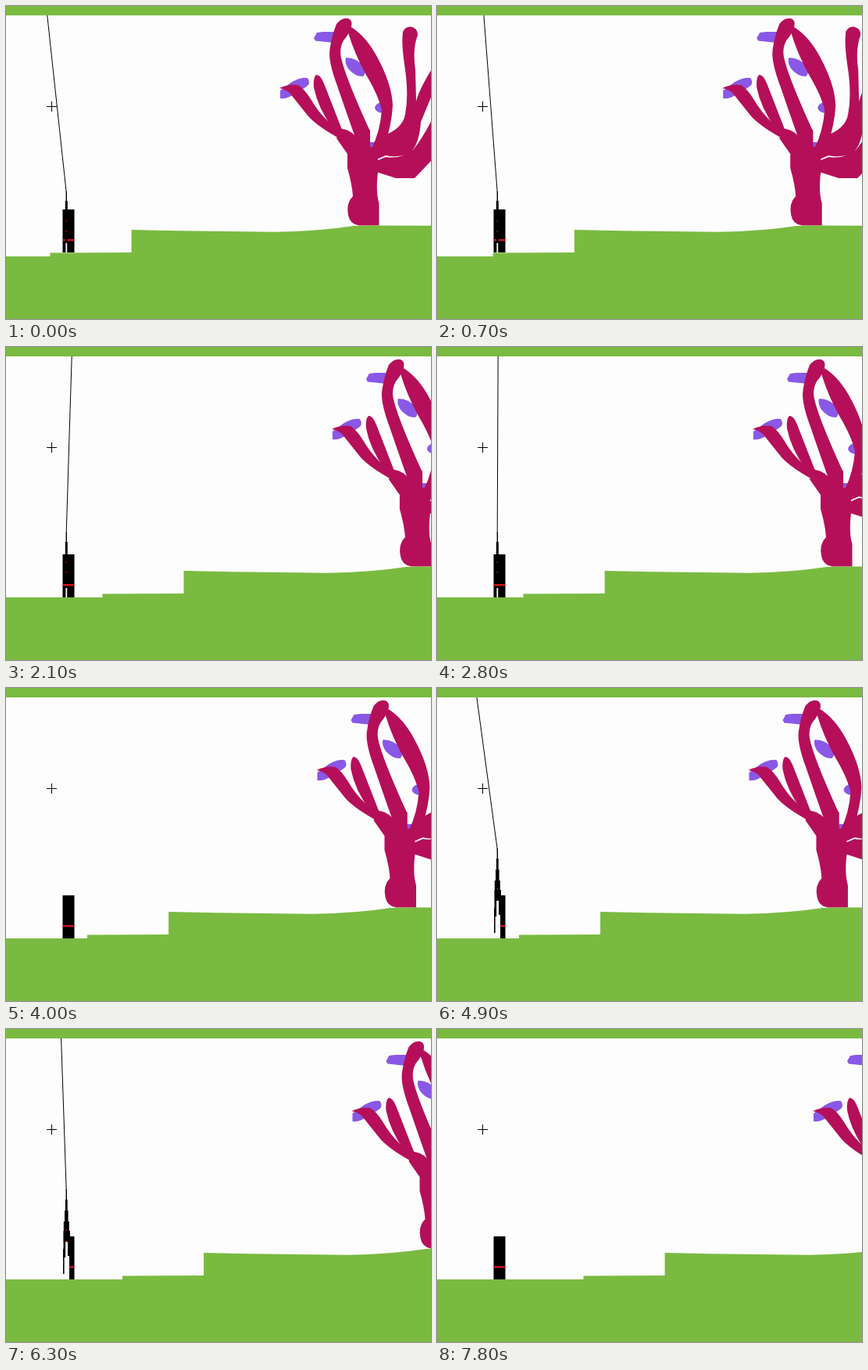
These frames come from a looping animation (544x400 px, 8 s). An HTML page with a canvas:

```html
<!DOCTYPE html>
<html lang="en">
<head>
<meta charset="utf-8">
<title>Rope swing</title>
<style>
  html, body { margin: 0; width: 100%; height: 100%; overflow: hidden; background: #fdfdfd; }
  canvas { display: block; }
</style>
</head>
<body>
<canvas id="stage" width="544" height="400"></canvas>
<script>
const ctx = document.getElementById('stage').getContext('2d');
const LOOP = 8000, STEP = 100;
const GREEN = '#7aba40', SKY = '#fdfdfd', BARK = '#b50f59', PETAL = '#8a58e6', RED = '#d8141c';

// Scroll keys: time in ms, offset in px, speed in px per step
const scrollKeys = [
  [0, 0, 0], [900, 26, 6.2], [1300, 58.5, 6.5], [1700, 71, 0], [2800, 54, -1.1], [4000, 47.5, 0],
  [4700, 47.5, 0], [5500, 62, 3.5], [6300, 92.5, 3.7], [7800, 131, 1.2]
];

const ground = new Path2D(`M-200 320H56.500V315.500L160.600 315V286L220 287.300L345 288.700
  Q400 288 445 281L470 280.500L700 281V400H-200Z`);

const petals = new Path2D(`
  M394 41L398 34L406 33H425V47.500L396 44.500Z
  M435 66Q450 66 460 79Q461 86 457 90Q446 90 438 80Q433 72 435 66Z
  M351 108L366 97Q377 91 386 92Q390 98 386 102L377 108L363 116Q357 119 351 118Z
  M483 122Q473 124 472 130Q473 136 483 137Z
  M463 174H473V183H463Z`);

const tree = [
  // trunk
  'M423 169L428 157Q438 157 446 165L466 158V180L476 179V212Q473 238 477.500 252V280.500H452Q440 279 438 267Q435 252 444 243Q443 228 437 207V189Z',
  // loop, left and right limbs
  'M446 165Q436 137 424 102Q412 70 414.500 55Q417 38 423 23Q430 14 438 16Q444 18 442 27Q439 36 432 44Q427 53 428.500 64Q433 88 466 160V185Z',
  'M438 34L442 27Q461 39 475 65Q494 100 495 127Q494 150 484 182L478 195L468 182Q479 160 481 133Q477 115 461 88Q446 61 438 34Z',
  // left limbs
  'M350 105Q362 99 374 101Q382 106 390 119Q400 136 412 147L432 158L430 171Q400 155 387 141L363 111Q357 106 350 105Z',
  'M397 88Q402 87 407 99L430 158L418 156Q399 130 394 104Q393 92 397 88Z',
  // right limbs
  'M473 180L482 166Q508 157 511 138Q516 112 510 75Q506 48 508 33Q511 26 518 26.500Q527 28 527 37Q520 55 524 82L525 122Q528 108 546 79V112L531 148Q529 175 519 186Q505 195 486 191L474 196Z',
  'M474 198L486 193Q500 195 510 190L521 184Q532 171 546 144V196L523 220H499L474 212Z'
].map(d => new Path2D(d));

function scrollAt(t) {
  let i = 0;
  while (i < scrollKeys.length - 2 && t > scrollKeys[i + 1][0]) i++;
  const [t0, a, va] = scrollKeys[i], [t1, b, vb] = scrollKeys[i + 1];
  const u = Math.min(1, (t - t0) / (t1 - t0)), n = (t1 - t0) / STEP;
  const u2 = u * u, u3 = u2 * u;
  return a * (2 * u3 - 3 * u2 + 1) + va * n * (u3 - 2 * u2 + u)
    + b * (3 * u2 - 2 * u3) + vb * n * (u3 - u2);
}

const ramp = (t, from, to) => Math.max(0, Math.min(1, (t - from) / (to - from)));

function box(color, x, y, w, h) {
  ctx.fillStyle = color;
  ctx.fillRect(x, y, w, h);
}

function line(x0, y0, x1, y1) {
  ctx.strokeStyle = '#000';
  ctx.lineWidth = 1;
  ctx.beginPath();
  ctx.moveTo(x0, y0);
  ctx.lineTo(x1, y1);
  ctx.stroke();
}

function body(x, y) {
  box('#000', x, y, 87.5 - x, 55);
  box(RED, x, y + 38, 87.5 - x, 2.3);
}

function spots(y, ...offsets) {
  for (const dy of offsets) box('#8c1015', 76.5, y + dy, 1.6, 2);
}

// Short reach: a mast above a split body
function shortArm(tip, y) {
  body(72.5, y);
  box('#000', 76.6, tip, 1.4, 13);
  box('#000', 75.8, tip + 12, 3, 53);
  box(SKY, 76.4, y + 43, 1.8, 12);
  spots(tip, 37, 50);
}

// Long reach: a tapered, two-legged arm beside a half body
function longArm(tip, y) {
  body(81, y);
  ctx.save();
  ctx.beginPath();
  ctx.rect(60, 0, 40, y + 55);
  ctx.clip();
  for (const [dy, w, h] of [[0, 1.4, 14], [13, 2.8, 15], [27, 4.6, 15], [41, 7, 26]])
    box('#000', 77.3 - w / 2, tip + dy, w, h);
  box('#000', 73.5, tip + 53, 2.6, 34);
  box('#000', 73, tip + 76, 1.6, 32);
  box('#000', 79, tip + 53, 3, 32);
  spots(tip, 51, 65);
  box('#b01218', 73.3, tip + 92, 1.2, 2);
  ctx.restore();
}

function player(t, y) {
  if (t < 4000) shortArm(237 + 28 * ramp(t, 3400, 4000), y);
  else if (t < 4600 || t >= 7800) body(72.5, y);
  else longArm(205 + 60 * Math.max(1 - ramp(t, 4500, 4800), ramp(t, 7000, 7800)), y);
}

function draw(t) {
  const s = scrollAt(t);
  box(SKY, 0, 0, 544, 400);

  ctx.save();
  ctx.translate(s, 0);
  ctx.fillStyle = PETAL;
  ctx.fill(petals);
  ctx.fillStyle = BARK;
  tree.forEach(p => ctx.fill(p));
  ctx.fillStyle = GREEN;
  ctx.fill(ground);
  ctx.restore();

  // The anchors lie above the stage and scroll with the world
  if (t < 3500) line(77.2, 238, 25.2 + s, -243);
  else if (t >= 4700 && t < 7100) line(77.2, 206, s - 30.1, -228);

  player(t, 260 + 5 * ramp(t, 900, 1100));
  box(GREEN, 0, 0, 544, 12);
  if (t >= 4600 && t < 4700) line(77.3, 258, 43.5, 0);

  line(52, 128.5, 65, 128.5);
  line(58.5, 122, 58.5, 135);
}

const start = performance.now();
function tick() {
  const t = (performance.now() - start) % LOOP;
  draw(Math.floor(t / STEP) * STEP);
  requestAnimationFrame(tick);
}
tick();
</script>
</body>
</html>
```
